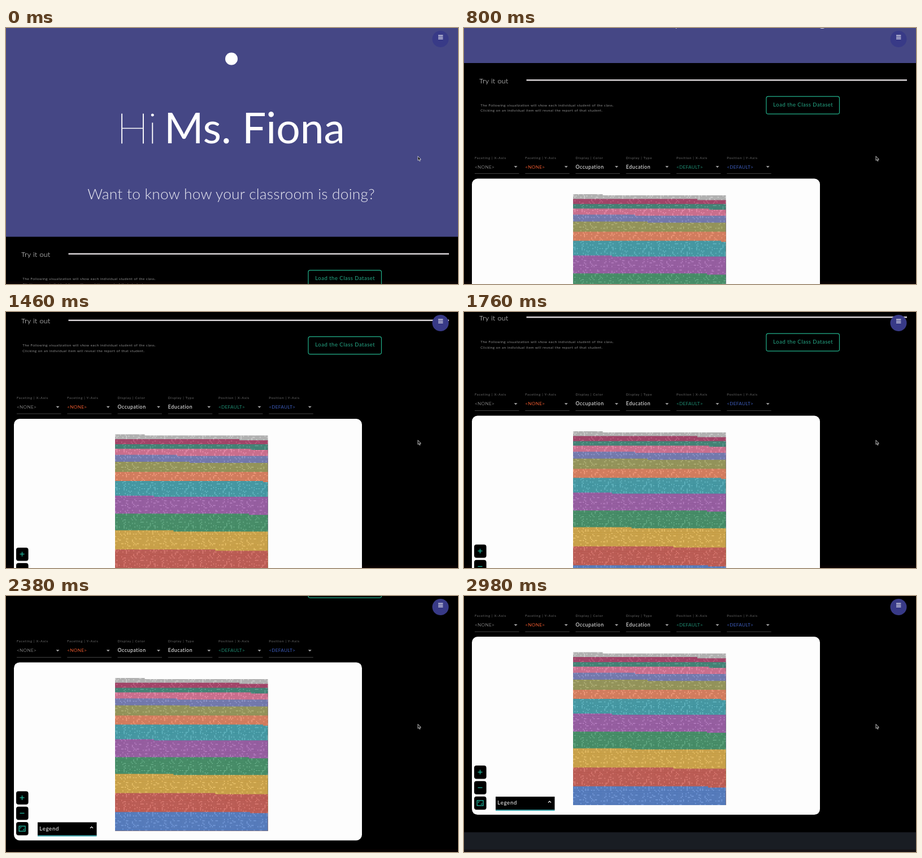
These frames come from a looping animation (800x453 px, 3 s). An HTML page:

```html
<!DOCTYPE html>
<html lang="en">
<head>
<meta charset="utf-8">
<title>Classroom dashboard</title>
<style>
  html, body { margin: 0; width: 100%; height: 100%; overflow: hidden; background: #000; }
  svg { display: block; width: 800px; height: 453px; font-family: Lato, "Open Sans", sans-serif; fill: #fff; }
  .thin { font-weight: 100; stroke: #fff; stroke-width: .9px; }
  .light { font-weight: 300; }
  .hero { font-size: 75px; }
  .ask { font-size: 26.3px; letter-spacing: .25px; fill: #e9e9f2; }
  .title { font-size: 12.5px; letter-spacing: .35px; }
  .note { font-size: 6.3px; letter-spacing: .52px; }
  .load { font-size: 9.5px; letter-spacing: .5px; fill: #25a987; }
  .label { font-size: 6px; letter-spacing: .72px; fill: #6c6c6c; }
  .value { font-size: 8.8px; letter-spacing: .55px; }
  .empty { font-size: 8.2px; letter-spacing: .3px; }
  .legend { font-size: 9.5px; letter-spacing: .8px; }
  .icon { fill: none; stroke: #22b8a0; stroke-width: 1.3; }
</style>
</head>
<body>
<svg viewBox="0 0 800 453">
  <defs>
    <pattern id="marks" patternUnits="userSpaceOnUse" x="193" y="601.5"></pattern>
  </defs>
  <rect width="800" height="453" fill="#000"/>

  <g class="scroll">
    <rect width="800" height="369.5" fill="#454785"/>
    <rect y="920" width="800" height="200" fill="#191d23"/>
  </g>
  <rect y="448.5" width="800" height="5" fill="#140808" opacity=".45"/>

  <g class="scroll">
    <circle cx="399" cy="54.5" r="11"/>
    <text class="hero thin" x="196" y="204.5">Hi</text>
    <text class="hero" x="280" y="204.5">Ms. Fiona</text>
    <text class="ask light" x="398.5" y="303.5" text-anchor="middle">Want to know how your classroom is doing?</text>

    <text class="title light" x="27" y="405.5">Try it out</text>
    <rect x="110.5" y="398.5" width="673.5" height="2.5" fill="#d8d3d6"/>
    <text class="note light" x="29.3" y="446">The Following visualization will show each individual student of the class.</text>
    <text class="note light" x="29.3" y="455.6">Clicking on an individual item will reveal the report of that student.</text>
    <rect x="535" y="428.7" width="129.5" height="31" rx="3.5" fill="none" stroke="#22b08a" stroke-width="1.2"/>
    <text class="load" x="547.3" y="446.2">Load the Class Dataset</text>
    <g id="selects"></g>

    <rect x="14" y="574" width="616" height="315" rx="10" fill="#fdfdfd"/>
    <g id="bands"></g>

    <g id="tools"></g>
    <g class="icon">
      <path d="M24.5 813.5h8m-4-4v8M24.5 841h8"/>
      <rect x="23.2" y="863.8" width="10.8" height="9"/>
      <path d="M25.5 868v-2h2M31.7 868.5v2h-2" stroke-width="1"/>
    </g>
    <rect x="56" y="857" width="104.5" height="23.5" fill="#000"/>
    <rect x="56" y="880" width="104.5" height="2" fill="#3aa5ac"/>
    <text class="legend" x="59.3" y="871.2">Legend</text>
    <path d="M149 867.5l2.5-2.5 2.5 2.5" fill="none" stroke="#fff" stroke-width="1.2"/>
  </g>

  <circle cx="769" cy="19.5" r="14.5" fill="#383a87"/>
  <path d="M765 13.2h8.4M765 16.2h8.4M765 19.2h8.4" stroke="#fff" stroke-width="1.2"/>
  <path d="M729 226.8v7.6l1.7-1.5 1.2 2.7 1.4-.6-1.2-2.6h2.3z" fill="#111" stroke="#fff" stroke-width=".7"/>
</svg>
<script>
const DURATION = 3000;
const byId = id => document.getElementById(id);

// Dropdowns: label, value, colour
const selects = [
  ["Faceting | X-Axis", "<NONE>", "#777"],
  ["Faceting | Y-Axis", "<NONE>", "#e2562c"],
  ["Display | Color", "Occupation", "#fff"],
  ["Display | Type", "Education", "#fff"],
  ["Position | X-Axis", "<DEFAULT>", "#1f8d73"],
  ["Position | Y-Axis", "<DEFAULT>", "#3c5cbb"]
];
byId("selects").innerHTML = selects.map(([label, value, color], i) => {
  const x = 19 + 89.25 * i;
  const kind = value[0] === "<" ? "empty" : "value";
  return `<text class="label" x="${x}" y="539">${label}</text>
    <text class="${kind}" x="${x}" y="556" style="fill:${color}">${value.replace("<", "&lt;")}</text>
    <path d="M${x + 69.5} 551.8h6l-3 3z" fill="#aaa"/>
    <rect x="${x}" y="564.6" width="78.5" height=".9" fill="#4a4a4a"/>`;
}).join("");

byId("tools").innerHTML = [802, 829.3, 856.6].map(y =>
  `<rect x="18" y="${y + 1}" width="22" height="23.5" rx="4.5" fill="#000" opacity=".18"/>
   <rect x="18" y="${y}" width="21.5" height="23.3" rx="4" fill="#000"/>`).join("");

// Student grid, filled from the bottom left: colour, top edge, x where the top row ends
const LEFT = 193, RIGHT = 463.5, BOTTOM = 872, CELL = 270.5 / 128;
const bands = [
  ["#b9b9b9", 601.5, 245.5],
  ["#a62f5d", 610, 413],
  ["#2c7c6c", 619, 463.5],
  ["#d9658c", 627, 433.5],
  ["#6a72b4", 637.7, 303],
  ["#93934a", 650, 325],
  ["#e4764f", 668, 463.5],
  ["#2f98a6", 684, 455],
  ["#964fa4", 710, 262],
  ["#318a5b", 741.8, 430],
  ["#d8a535", 771.3, 296.5],
  ["#c64d43", 805.3, 370.5],
  ["#4474c6", 838.7, 432]
];
const fillDown = (fill, top, step) =>
  `<path fill="${fill}" d="M${LEFT} ${top}H${step}v${CELL}H${RIGHT}V${BOTTOM}H${LEFT}z"/>`;
const [, gridTop, gridStep] = bands[0];
byId("bands").innerHTML = bands.map(band => fillDown(...band)).join("")
  + fillDown("url(#marks)", gridTop, gridStep);

// Small marks inside each cell, with pale gaps between cells
function random(n) {
  const s = Math.sin(n * 127.1 + 31.7) * 43758.5453;
  return s - Math.floor(s);
}
const TILE = 32, SIZE = TILE * CELL;
let cells = "", gaps = "";
for (let i = 0; i < TILE * TILE; i++) {
  const x = (i % TILE) * CELL, y = Math.floor(i / TILE) * CELL;
  const shade = random(i) < .15 ? `fill="#fff" opacity=".22"` : `fill="#000" opacity=".24"`;
  cells += `<rect x="${x + .5}" y="${y + .5}" width="1.4" height="1.4" ${shade}/>`;
}
for (let i = 0; i < TILE; i++) {
  const p = i * CELL;
  gaps += `<path d="M0 ${p}h${SIZE}v.5H0zM${p} 0h.5v${SIZE}h-.5z"/>`;
}
const marks = byId("marks");
marks.setAttribute("width", SIZE);
marks.setAttribute("height", SIZE);
marks.innerHTML = `${cells}<g fill="#fff" opacity=".3">${gaps}</g>`;

// Scroll keys: time (ms), offset (px), speed (px/ms)
const keys = [
  [0, 0, .08],
  [560, 182, .62],
  [1040, 368, .085],
  [1460, 385, .026],
  [2180, 395, .012],
  [2580, 526, .1],
  [2640, 529, 0],
  [2700, 526.5, -.07],
  [3000, 500.5, -.07]
];
function scrollAt(t) {
  const i = keys.findIndex(k => t < k[0]);
  const [t0, y0, v0] = keys[i - 1], [t1, y1, v1] = keys[i];
  const d = t1 - t0, u = (t - t0) / d, w = 1 - u;
  return w * w * (y0 * (1 + 2 * u) + v0 * d * u) + u * u * (y1 * (3 - 2 * u) - v1 * d * w);
}

const layers = document.querySelectorAll(".scroll");
function draw() {
  const y = scrollAt(performance.now() % DURATION);
  layers.forEach(g => g.setAttribute("transform", `translate(0 ${-y.toFixed(2)})`));
  requestAnimationFrame(draw);
}
draw();
</script>
</body>
</html>
```
